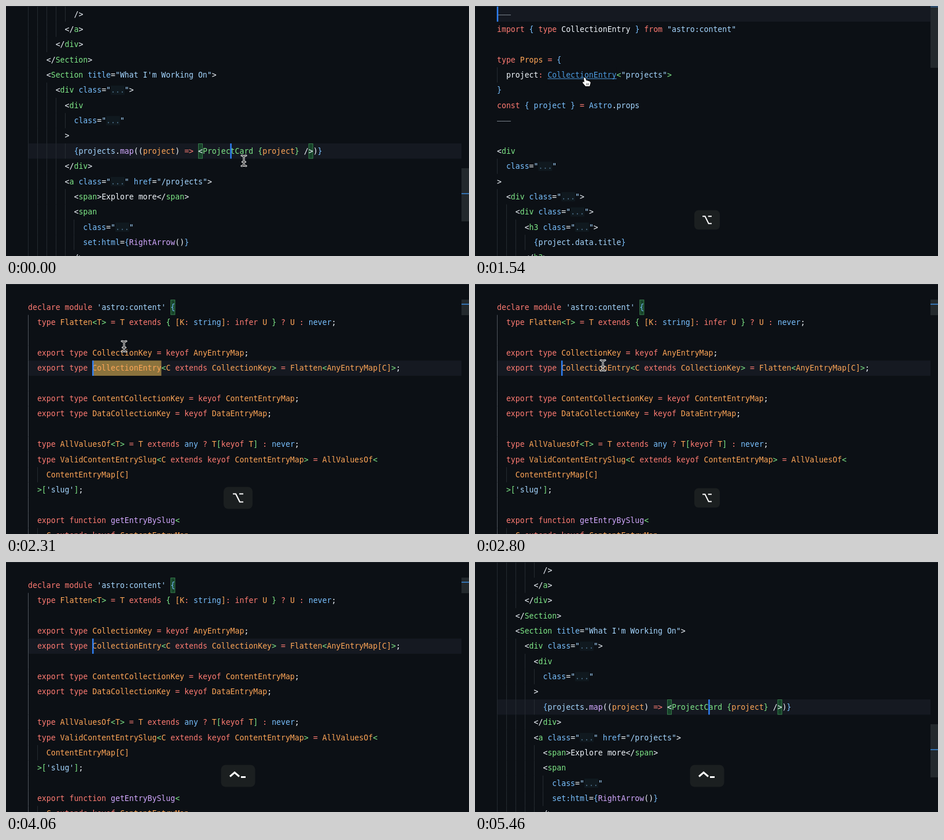
These frames come from a looping animation (800x433 px, 5530 ms). An HTML page with a canvas:

```html
<!DOCTYPE html>
<html lang="en">
<head>
<meta charset="utf-8">
<title>Go to definition</title>
<style>
html, body { margin: 0; width: 100%; height: 100%; overflow: hidden; background: #0c1015; }
canvas { display: block; width: 800px; height: 433px; }
</style>
</head>
<body>
<canvas id="stage" width="800" height="433"></canvas>
<script>
const ctx = document.getElementById('stage').getContext('2d');
const LOOP = 5530, STEP = 70;
const LEFT = 38, CHAR = 7.946, ROW = 26.36, TOP = 0.8;
const FONT = '13.2px "DejaVu Sans Mono", "Liberation Mono", monospace';
const COLORS = {
  w: '#f0f6fc', r: '#ff7b72', b: '#79c0ff', s: '#a5d6ff', g: '#7ee787',
  o: '#ffa657', p: '#d2a8ff', f: '#4d718c', d: '#7d858e'
};

// "~x" switches the text colour; ~f marks a folded value.
const fold = '~w=~s"~f...~s"';
const PAGE = `          ~w/>
        ~w</~ga~w>
      ~w</~gdiv~w>
    ~w</~gSection~w>
    ~w<~gSection ~btitle~w=~s"What I'm Working On"~w>
      ~w<~gdiv ~bclass${fold}~w>
        ~w<~gdiv
          ~bclass${fold}
        ~w>
          ~b{~sprojects~w.~pmap~w((~oproject~w) ~r=> ~w<~gProjectCard {~oproject~g} ~w/>)~b}
        ~w</~gdiv~w>
        ~w<~ga ~bclass${fold} ~bhref~w=~s"/projects"~w>
          ~w<~gspan~w>Explore more</~gspan~w>
          ~w<~gspan
            ~bclass${fold}
            ~bset:html~w=~b{~pRightArrow~w()~b}
          ~w/>`.split('\n');

const CARD = `~d———
~rimport ~b{ ~rtype ~wCollectionEntry ~b} ~rfrom ~s"astro:content"

~rtype ~oProps ~r= ~b{
  ~wproject~r: ~oCollectionEntry~g<~s"projects"~g>
~b}
~rconst ~b{ project } ~r= ~bAstro~w.~sprops
~d———

~w<~gdiv
  ~bclass${fold}
~w>
  ~w<~gdiv ~bclass${fold}~w>
    ~w<~gdiv ~bclass${fold}~w>
      ~w<~gh3 ~bclass${fold}~w>
        ~b{~sproject.data.title~b}
      ~w</~gh3~w>`.split('\n');

const TYPES = `
~rdeclare module ~s'astro:content' ~b{
  ~rtype ~oFlatten~g<~oT~g> ~r= ~oT ~rextends ~g{ ~o[K~r: ~bstring~o]~r: infer ~oU ~g} ~r? ~oU ~r: ~bnever~w;

  ~rexport type ~oCollectionKey ~r= keyof ~oAnyEntryMap~w;
  ~rexport type ~oCollectionEntry~g<~oC ~rextends ~oCollectionKey~g> ~r= ~oFlatten~g<~oAnyEntryMap[C]~g>~w;

  ~rexport type ~oContentCollectionKey ~r= keyof ~oContentEntryMap~w;
  ~rexport type ~oDataCollectionKey ~r= keyof ~oDataEntryMap~w;

  ~rtype ~oAllValuesOf~g<~oT~g> ~r= ~oT ~rextends ~bany ~r? ~oT~g[~rkeyof ~oT~g] ~r: ~bnever~w;
  ~rtype ~oValidContentEntrySlug~g<~oC ~rextends keyof ~oContentEntryMap~g> ~r= ~oAllValuesOf~g<
    ~oContentEntryMap[C]
  ~g>[~s'slug'~g]~w;

  ~rexport function ~pgetEntryBySlug~g<
    ~oC ~rextends keyof ~oContentEntryMap~w,`.split('\n');

const TIP = '~w(loading...) ~rtype ~oCollectionKey ~r= ~s"posts" ~r| ~s"projects"';

// caret: [row, col]; bar: [top, bottom, mark] of the scroll slider
const page = { lines: PAGE, bar: [281, 373, 325], pairs: [[9, 37], [9, 61]] };
const card = { lines: CARD, bar: [0, 107, 1], pairs: [], caret: [0, 0] };
const inCard = { lines: CARD, bar: [0, 107, 23], pairs: [[3, 13], [5, 0]], caret: [4, 20], active: [4, 4] };
const types = { lines: TYPES, bar: [27, 54, 35], pairs: [[1, 31]], caret: [5, 14], active: [2, 16] };
const VIEWS = [
  [0, { ...page, caret: [9, 44] }], [420, { ...page, caret: [9, 46] }],
  [490, card], [1820, inCard], [1890, types], [4200, inCard],
  [5110, { ...page, caret: [9, 46] }]
];
const MOUSE = [
  [0, 411, 268], [70, 411, 268], [280, 404, 252], [630, 404, 252], [910, 250, 165],
  [1050, 250, 165], [1190, 205, 133], [1330, 201, 128], [1400, 190, 124], [2170, 190, 124],
  [2310, 204, 108], [2660, 204, 108], [2800, 221, 141], [2940, 223, 121], [3360, 223, 121],
  [3570, 311, 220], [3710, 322, 232]
];
const KEYS = [[210, 840, 'opt'], [1540, 2590, 'opt'], [2800, 3710, 'opt'], [3920, LOOP + 140, 'back']];
const LINKS = [[280, 490, 9, 38, 'ProjectCard'], [1400, 1890, 4, 11, 'CollectionEntry']];

const HAND = new Path2D('M-2 1Q-1-1 1 1L2 5Q4 4 5 6Q7 5 8 7Q10 7 9.5 10L8 15H1L-4 9Q-4 6-1 8Z');
const BEAM = new Path2D('M-4-9Q0-9 0-6Q0-9 4-9M0-6V6M-4 9Q0 9 0 6Q0 9 4 9M-2.5 2H2.5');
const GLYPHS = {
  opt: { width: 50, pen: 2.2, path: new Path2D('M-9-7H-4L3 7H9M2-7H9') },
  back: { width: 59, pen: 3, path: new Path2D('M-14 1L-6-6L2 1M5 2H13') }
};

const within = (t, a, b) => t >= a && t < b;
const colX = col => LEFT + col * CHAR;
const rowY = row => TOP + row * ROW;

function rect(x, y, w, h, color) {
  ctx.fillStyle = color;
  ctx.fillRect(x, y, w, h);
}

function cells(row, col, count, color) {
  rect(colX(col), rowY(row), count * CHAR, ROW, color);
}

function panel(x, y, w, h, r, color) {
  ctx.beginPath();
  ctx.roundRect(x, y, w, h, r);
  ctx.fillStyle = color;
  ctx.fill();
}

function text(line, x, mid) {
  for (const part of line.split('~')) {
    const plain = part.trim() === '' && !COLORS[part[0]];
    const str = plain ? part : part.slice(1);
    if (part[0] === 'f' && !plain) rect(x, mid - 8, str.length * CHAR, 16, '#10191f');
    if (!plain) {
      ctx.fillStyle = COLORS[part[0]];
      ctx.fillText(str, x, mid + 4.6);
    }
    x += str.length * CHAR;
  }
}

function guides(view) {
  view.lines.forEach((line, row) => {
    const blankInside = !line && view.lines === TYPES && row > 1;
    const indent = blankInside ? 2 : line.search(/\S/);
    for (let col = 0; col < indent; col += 2) {
      const [from, to] = view.active || [99, 99];
      const lit = col === 0 && within(row, from, to + 1);
      rect(Math.round(colX(col)), rowY(row), 1, ROW, lit ? '#50565d' : '#252b31');
    }
  });
}

function editor(view, t) {
  const [row, col] = view.caret;
  const isTypes = view.lines === TYPES;
  rect(0, 0, 800, 433, '#0c1015');
  rect(LEFT, rowY(row), 749, ROW, '#151921');
  guides(view);
  if (isTypes && t < 2450) cells(5, 14, 15, '#8b733d');
  if (isTypes && within(t, 3010, 3640)) cells(4, 14, 13, '#142635');
  for (const [r, c] of view.pairs) {
    cells(r, c, 1, '#17432a');
    ctx.strokeStyle = '#387a4b';
    ctx.lineWidth = 1;
    ctx.strokeRect(colX(c) + .5, rowY(r) + .5, CHAR - 1, ROW - 1);
  }
  view.lines.forEach((line, i) => text(line, LEFT, rowY(i) + ROW / 2));
  for (const [from, to, r, c, word] of LINKS) {
    if (!within(t, from, to)) continue;
    cells(r, c, word.length, r === row ? '#151921' : '#0c1015');
    ctx.fillStyle = '#4c9be0';
    ctx.fillText(word, colX(c), rowY(r) + ROW / 2 + 4.6);
    ctx.fillRect(colX(c), rowY(r) + ROW / 2 + 6, word.length * CHAR, 1);
  }
  rect(colX(col) - .3, rowY(row), 2.5, ROW, '#2f81f7');
  const [top, bottom, mark] = view.bar;
  rect(787, top, 13, bottom - top, '#23292d');
  rect(787, mark - 1, 13, 2, '#3573b1');
  rect(0, 0, 800, 1, '#20262c');
}

function tooltip() {
  panel(149, 67, 451, 39, 4, '#3b414a');
  panel(150, 68, 449, 37, 3, '#141920');
  text(TIP, 158.5, 85.5);
}

function keyBadge(t) {
  for (const [start, end, name] of KEYS) {
    if (!within(t, start, end)) continue;
    const { width, pen, path } = GLYPHS[name];
    const scale = .88 + .12 * Math.min(1, (t - start) / 140);
    ctx.save();
    ctx.globalAlpha = Math.min(1, (end - t) / 140);
    ctx.translate(401, 370.5);
    ctx.scale(scale, scale);
    panel(-width / 2, -19, width, 38, 8, '#1b1f20');
    ctx.strokeStyle = '#fff';
    ctx.lineWidth = pen;
    ctx.stroke(path);
    ctx.restore();
  }
}

function mousePos(t) {
  const next = MOUSE.findIndex(k => k[0] > t);
  if (next < 0) return MOUSE[MOUSE.length - 1].slice(1);
  const [t0, x0, y0] = MOUSE[next - 1], [t1, x1, y1] = MOUSE[next];
  const u = (t - t0) / (t1 - t0), e = u * u * (3 - 2 * u);
  return [x0 + (x1 - x0) * e, y0 + (y1 - y0) * e];
}

function pointer(t) {
  if (t >= 3920) return;
  const hand = LINKS.some(([from, to]) => within(t, from, to));
  ctx.save();
  ctx.translate(...mousePos(t));
  ctx.lineCap = ctx.lineJoin = 'round';
  ctx.strokeStyle = hand ? '#000' : '#fff';
  ctx.lineWidth = hand ? 1.6 : 3;
  ctx.stroke(hand ? HAND : BEAM);
  if (hand) {
    ctx.fillStyle = '#fff';
    ctx.fill(HAND);
    ctx.lineWidth = .8;
    ctx.stroke(new Path2D('M3 10V13M5.5 10V13'));
  } else {
    ctx.strokeStyle = '#111';
    ctx.lineWidth = 1.1;
    ctx.stroke(BEAM);
  }
  ctx.restore();
}

let origin;
function draw(now) {
  origin ??= now;
  const t = Math.floor(((now - origin) % LOOP) / STEP) * STEP;
  ctx.font = FONT;
  editor(VIEWS.filter(v => v[0] <= t).pop()[1], t);
  if (within(t, 3080, 3640)) tooltip();
  keyBadge(t);
  pointer(t);
  requestAnimationFrame(draw);
}
requestAnimationFrame(draw);
</script>
</body>
</html>
```
